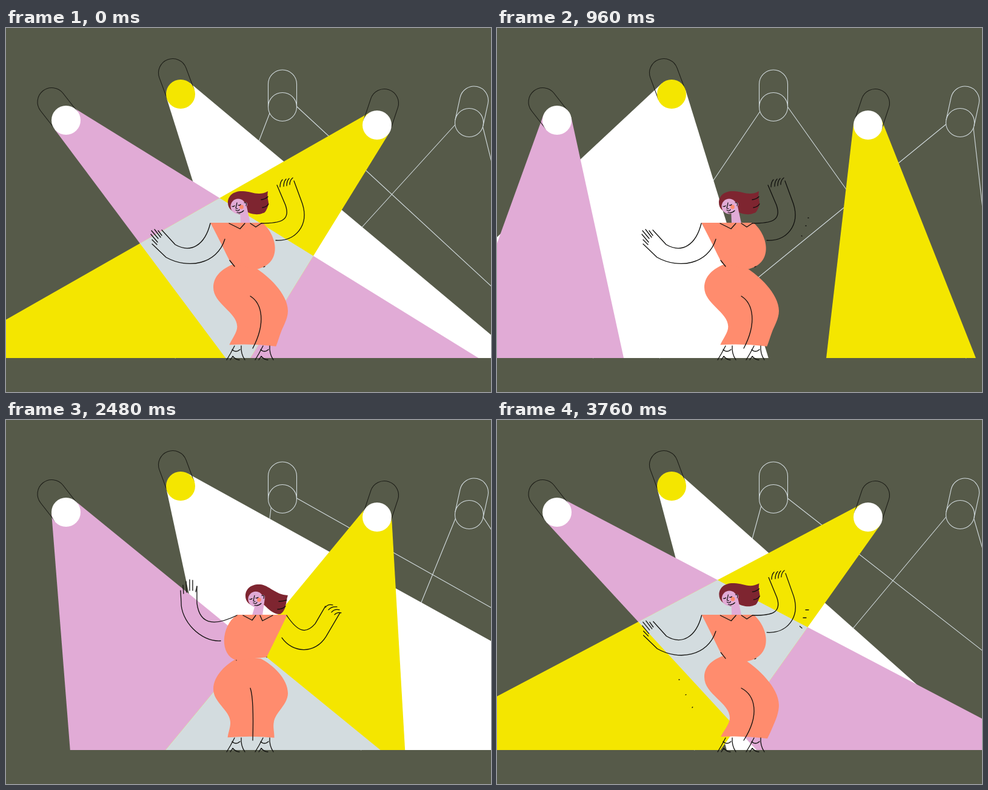
An HTML page with a canvas that plays this animation: 800x600 px, repeating every 3840 ms.

```html
<!DOCTYPE html>
<html lang="en">
<head>
<meta charset="utf-8">
<title>Spotlight dance</title>
<style>
  html, body { margin: 0; width: 100%; height: 100%; overflow: hidden; background: #565a49; }
  canvas { display: block; width: 800px; height: 600px; }
</style>
</head>
<body>
<canvas id="stage" width="800" height="600"></canvas>
<script>
const ctx = document.getElementById('stage').getContext('2d');
const LOOP = 3840, STEP = 80, BEAT = 480, FLOOR = 544;
const BG = '#565a49', YELLOW = '#f4e600', PINK = '#e1abd6', WHITE = '#fff', PALE = '#d3dcdf',
      CORAL = '#ff8c6e', HAIR = '#7e2530', INK = '#10100e';

// Edge angles in degrees from vertical, at these times of the loop.
const TIMES = [0, 560, 960, 1600, 2480, 2960, 3760];
const lamps = {
  white:  { x: 288, y: 109, top: [275, 74], lens: YELLOW, beam: WHITE,
            left: [17.5, 27.1, -47, -59.3, 12.2, -24.4, 14.9],
            right: [50.1, 55.9, 17.2, 11.4, 61.1, 27, 48.4] },
  pink:   { x: 99, y: 152, top: [75.5, 122], lens: WHITE, beam: PINK,
            left: [36.8, -2.8, -19.9, -29.2, 4.5, 21.3, 42.7],
            right: [58.3, 29, 12.3, 2.9, 50.8, 53, 62.35] },
  yellow: { x: 612, y: 160, top: [624, 124], lens: WHITE, beam: YELLOW,
            left: [-60.35, -40.1, -6.65, 17.9, -39.6, -53.15, -62.2],
            right: [-31.7, 3, 21.6, 38.65, 3.3, -19.8, -35.4] },
  lineA:  { x: 456, y: 130, top: [456, 92.5], from: [[439, 130], [478, 128]],
            left: [-21.1, -31.3, -34.1, -32.1, -7, -5.6, -15.3],
            right: [47.3, 37.1, 35.4, 37.2, 60.65, 62.5, 52] },
  lineB:  { x: 764, y: 156, top: [772, 119.5], from: [[744, 156], [785, 157]],
            left: [-42.3, -52.9, -50.8, -38.7, -22.2, -25.5, -39.9],
            right: [14, 4, 6.5, 18.4, 33, 30.6, 16.1] }
};

// Smooth periodic curve through the values at TIMES.
function curve(values, t) {
  const n = TIMES.length;
  const time = i => TIMES[(i + n) % n] + Math.floor(i / n) * LOOP;
  const value = i => values[(i + n) % n];
  const slope = i => {
    const a = time(i) - time(i - 1), b = time(i + 1) - time(i);
    return (a * (value(i + 1) - value(i)) / b + b * (value(i) - value(i - 1)) / a) / (a + b);
  };
  let i = n - 1;
  while (TIMES[i] > t) i--;
  const d = time(i + 1) - time(i), s = (t - time(i)) / d, r = 1 - s;
  return r * r * (1 + 2 * s) * value(i) + s * s * (3 - 2 * s) * value(i + 1)
       + d * s * r * (r * slope(i) - s * slope(i + 1));
}

function ease(x) {
  let lo = 0, hi = 1;
  for (let i = 0; i < 30; i++) {
    const s = (lo + hi) / 2, r = 1 - s;
    if (3 * r * r * s * 0.44 + 3 * r * s * s * 0.0525 + s * s * s < x) lo = s; else hi = s;
  }
  return lo * lo * (3 - 2 * lo);
}

// Snaps between 1 and -1 on every beat.
function swing(t) {
  const p = t % (2 * BEAT);
  return p < BEAT ? 1 - 2 * ease(p / BEAT) : 2 * ease(p / BEAT - 1) - 1;
}

function fill(path, color) { ctx.fillStyle = color; ctx.fill(path); }
function stroke(path, color = INK, width = 1.3) {
  ctx.strokeStyle = color;
  ctx.lineWidth = width;
  ctx.stroke(path);
}
function disc(x, y, r, ry = r) {
  const p = new Path2D();
  p.ellipse(x, y, r, ry, 0, 0, 7);
  return p;
}
// Blends two path strings that share the same commands.
function mix(a, b, k) {
  const to = b.match(/[\d.]+/g);
  let i = 0;
  return new Path2D(a.replace(/[\d.]+/g, v => (+v + (to[i++] - v) * k).toFixed(2)));
}

function beamPath(lamp, t) {
  const edge = (values, side) => {
    const a = curve(values, t) * Math.PI / 180;
    const x = lamp.x + side * 24 * Math.cos(a), y = lamp.y - side * 24 * Math.sin(a);
    return [[x, y], [x + (FLOOR - y) * Math.tan(a), FLOOR]];
  };
  const [l0, l1] = edge(lamp.left, -1), [r0, r1] = edge(lamp.right, 1);
  return new Path2D(`M${l0}L${r0}L${r1}L${l1}Z`);
}

function housing(lamp, color) {
  const [x, y] = lamp.top, a = Math.atan2(lamp.y - y, lamp.x - x), r = 23.5;
  const nx = -Math.sin(a) * r, ny = Math.cos(a) * r;
  const p = new Path2D();
  p.moveTo(lamp.x + nx, lamp.y + ny);
  p.arc(x, y, r, a + Math.PI / 2, a + Math.PI * 1.5);
  p.lineTo(lamp.x - nx, lamp.y - ny);
  stroke(p, color, 1.1);
}

function drawLineLamp(lamp, t) {
  [lamp.left, lamp.right].forEach((values, i) => {
    const [x, y] = lamp.from[i];
    const end = x + (FLOOR - y) * Math.tan(curve(values, t) * Math.PI / 180);
    stroke(new Path2D(`M${x} ${y}L${end} ${FLOOR}`), PALE, 1.1);
  });
  const ring = disc(lamp.x, lamp.y, 23.5);
  fill(ring, BG);
  housing(lamp, PALE);
  stroke(ring, PALE, 1.1);
}

function drawLights(t) {
  drawLineLamp(lamps.lineA, t);
  drawLineLamp(lamps.lineB, t);
  const solid = [lamps.white, lamps.pink, lamps.yellow];
  const beams = solid.map(lamp => beamPath(lamp, t));
  beams.forEach((beam, i) => fill(beam, solid[i].beam));
  ctx.save();
  ctx.clip(beams[1]);
  fill(beams[2], PALE);
  ctx.restore();
  for (const lamp of solid) {
    housing(lamp, '#1c1d17');
    fill(disc(lamp.x, lamp.y, 24), lamp.lens);
  }
}

// Hip outlines from waist to hem; the other sway is their mirror image.
const HIP_L = [[375, 388], [352, 396], [342, 408], [342, 424], [342, 452], [384, 466], [384, 491],
               [384, 501], [374, 512], [369, 522]];
const HIP_R = [[411, 397], [428, 408], [465, 440], [465, 470], [465, 482], [460, 494], [456, 503],
               [453, 510], [450, 517], [446, 525]];

function drawLegs(h) {
  const w = (1 + h) / 2;
  const blend = (a, b) => a.map(([x, y], i) =>
    [x * w + (807 - b[i][0]) * (1 - w), y * w + b[i][1] * (1 - w)]);
  const l = blend(HIP_L, HIP_R), r = blend(HIP_R, HIP_L).reverse();
  const hem = [(l[9][0] + r[0][0]) / 2, 520];
  fill(new Path2D(`M${l[0]}C${l.slice(1)}Q${hem} ${r[0]}C${r.slice(1)}Z`), CORAL);
  stroke(new Path2D(`M403 442C${404 + 22 * h} 454 ${404 + 30 * h} 486 407 528`));
  for (const x of [0, 47]) {
    ctx.save();
    ctx.translate(x, 0);
    stroke(new Path2D('M364 547L370 537L377 524M373 530Q379 536 386 530M388 524Q387 537 394 547' +
                      'M370 547L374 541Q379 547 385 547'));
    ctx.restore();
  }
}

function drawHead(k) {
  fill(mix('M385 307C372 303 366 297 366 288C366 276 376 268 391 269C405 269 416 278 432 269' +
           'C430 280 434 287 433 291C431 297 428 305 424 305C416 309 404 307 398 303Z',
           'M413 309C401 305 395 299 395 290C395 278 405 270 419 271C434 272 444 288 465 289' +
           'C462 298 463 302 461 306C461 311 456 319 452 320C442 321 432 311 426 305Z', k), HAIR);
  stroke(mix('M421 283Q428 282 432 278M423 296Q430 295 433 290',
             'M450 299Q457 299 463 297M448 312Q456 312 461 307', k));
  fill(mix('M386 298L387 322L403 322L397 294Z', 'M413 298L406 322L423 322L427 294Z', k), PINK);
  ctx.save();
  ctx.translate(29 * k, 1.3 * k);
  fill(disc(383, 294, 12.5), PINK);
  fill(disc(394, 291, 4), PINK);
  fill(disc(388.5, 295, 3.4), CORAL);
  stroke(new Path2D('M373 294Q375 295 377 293M383 292Q385 293 387 291M381 288L379 297L382 298' +
                    'M379 300Q384 303 385 299M381 304Q387 306 392 301M393 288Q398 287 396 293'), INK, 1.2);
  ctx.restore();
}

function drawUpperBody(k) {
  fill(mix('M337 321L423 321C450 345 455 390 412 398L371 388C360 366 350 345 337 321Z',
           'M381 321L464 321C455 340 442 366 430 391L380 396C352 388 354 340 381 321Z', k), CORAL);
  // Collar
  stroke(mix('M368 322L386 331L394 322M403 322L412 328L421 322',
             'M391 322L406 330L412 322M419 322L423 331L440 322', k));
  // Waist creases
  stroke(mix('M369 383L377 393M425 394L427 393', 'M380 396L380 396M430 391L430 391', Math.min(k, 1)));
  // Left arm and hand
  stroke(mix('M337 322C328 358 305 372 279 357L257 333M361 348C348 390 300 398 264 378L241 356',
             'M381 322C350 337 320 342 315 302L315 274M354 364C320 366 288 330 289 300L288 281', k));
  stroke(mix('M249 357L241 349M250 353L239 340M251 347L240 334M255 345L245 332M257 342L251 334',
             'M293 286L292 272M298 284L297 266M303 281L303 263M308 281L308 264M313 283L315 274', k));
  // Right arm and hand
  stroke(mix('M421 322C452 322 470 318 461 292L447 259M445 350C478 352 500 325 489 290L475 252',
             'M463 322C483 352 496 352 510 336L527 307M455 359C473 385 510 386 528 357L551 318', k));
  stroke(mix('M452 262Q452 254 456 250M458 261Q458 253 462 249M463 260Q463 252 467 248M468 258Q468 251 473 247',
             'M527 309Q531 303 539 305M532 313Q537 307 546 308M537 317Q542 311 550 313M542 321Q547 316 553 318', k));
}

// Short accents that shrink away after the sway to the right.
function drawAccents(t) {
  const p = t % 960 || (t ? 960 : 0);
  const ticks = (ends, len) => {
    if (p < 720 || len <= 0) return;
    for (const [x, y, dx, dy] of ends)
      stroke(new Path2D(`M${x - dx * len} ${y - dy * len}L${x} ${y}`));
  };
  ticks([[514, 313, 1, 0], [510, 326, 1, 0], [503, 343, 0.7, 0.6]], (960 - p) / 20 + 1);
  ticks([[300, 428, -1, 0], [311, 453, -0.9, 0.4], [322, 474, -0.7, 0.7]], (880 - p) / 20 + 1);
}

function draw(t) {
  ctx.fillStyle = BG;
  ctx.fillRect(0, 0, 800, 600);
  drawLights(t);
  const lean = (1 - swing(t)) / 1.84;
  drawLegs(swing(t + 80));
  drawHead(lean);
  drawUpperBody(lean);
  drawAccents(t);
}

ctx.lineCap = ctx.lineJoin = 'round';
const start = performance.now();
function tick() {
  const t = (performance.now() - start) % LOOP;
  draw(Math.floor(t / STEP) * STEP);
  requestAnimationFrame(tick);
}
tick();
</script>
</body>
</html>
```
